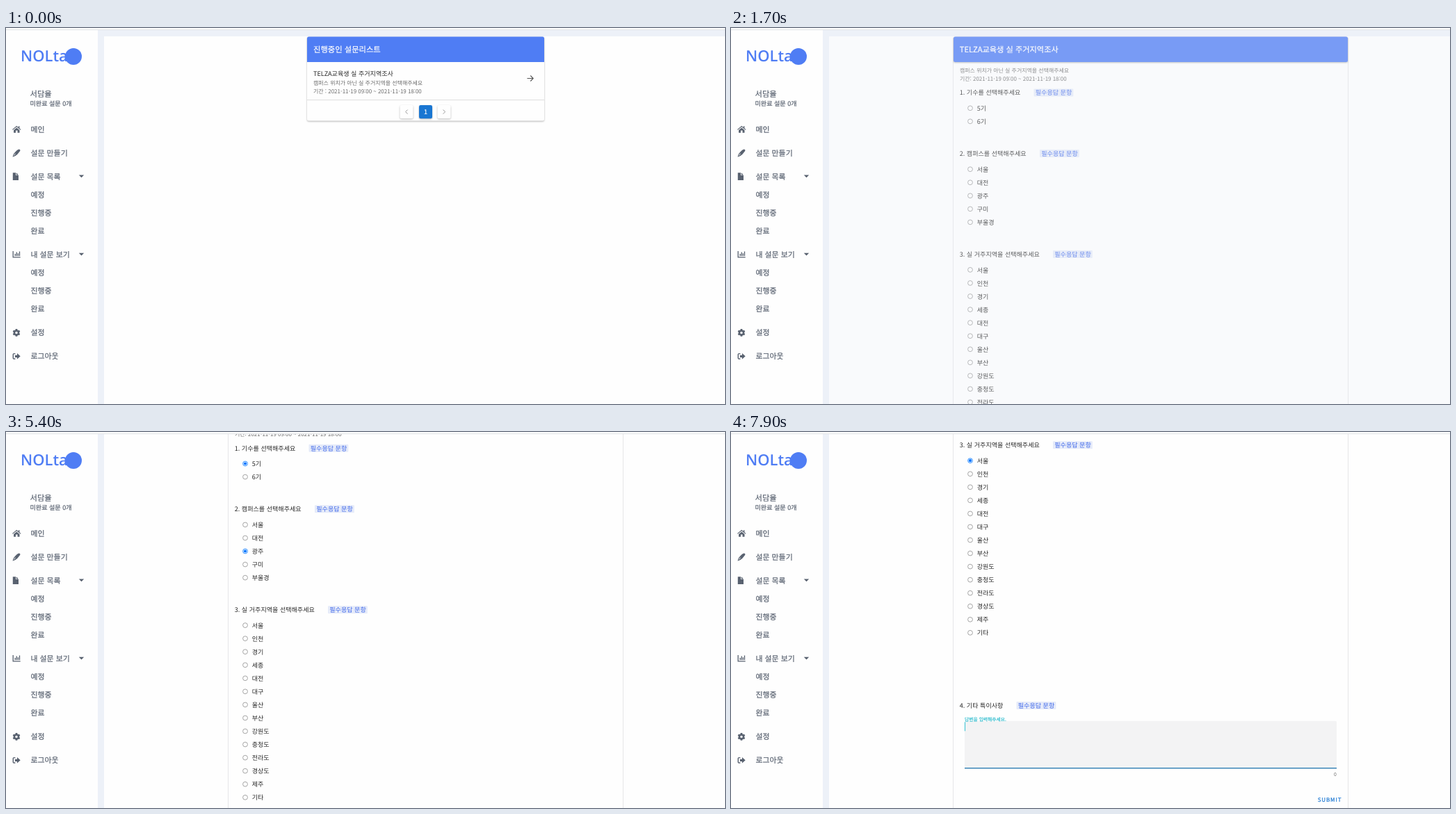
Recreate the animation shown at these times as an HTML page. Size 1034 by 541 pixels, loop 8000 ms.

```html
<!DOCTYPE html>
<html lang="ko">
<head>
<meta charset="utf-8">
<style>
  html, body { margin: 0; width: 100%; height: 100%; overflow: hidden; background: #edf1f8; }
  svg { display: block; }
  text {
    font-family: "Noto Sans CJK KR", "Noto Sans CJK", "Noto Sans CJK JP", sans-serif;
    text-rendering: geometricPrecision; white-space: pre;
  }
  .medium { font-weight: 500; stroke-width: .2; }
  .card { filter: drop-shadow(0 1px 1px rgba(0, 0, 0, .3)); }
  .raised { filter: drop-shadow(0 1px .8px rgba(0, 0, 0, .28)); }
</style>
</head>
<body>
<svg id="stage" width="1034" height="541" viewBox="0 0 1034 541"></svg>
<script>
const stage = document.getElementById('stage');
const BLUE = '#4f7df4', PRIMARY = '#1976d2', SLATE = '#596270', INK = '#262626', GREY = '#6a6a6a';
const LOOP = 8000;

function add(parent, tag, attrs = {}, content = '') {
  const node = document.createElementNS('http://www.w3.org/2000/svg', tag);
  set(node, attrs);
  node.textContent = content;
  return parent.appendChild(node);
}
function set(node, attrs) {
  for (const key in attrs) node.setAttribute(key, attrs[key]);
}
const group = (parent, attrs) => add(parent, 'g', attrs);
const rect = (parent, x, y, width, height, fill, attrs = {}) =>
  add(parent, 'rect', { x, y, width, height, fill, ...attrs });
const path = (parent, d, attrs) => add(parent, 'path', { d, ...attrs });
const line = (parent, d, stroke, width = 1) =>
  path(parent, d, { fill: 'none', stroke, 'stroke-width': width });

// y is the visual middle of the line of text
const text = (parent, content, x, y, size, fill, attrs = {}) =>
  add(parent, 'text', { x, y: y + size * .38, 'font-size': size, fill, ...attrs }, content);
const medium = (parent, content, x, y, size, fill, attrs = {}) =>
  text(parent, content, x, y, size, fill, { class: 'medium', stroke: fill, ...attrs });

const SURVEY = 'TELZA교육생 실 주거지역조사';
const NOTE = '캠퍼스 위치가 아닌 실 주거지역을 선택해주세요';
const PERIOD = '2021-11-19 09:00 ~ 2021-11-19 18:00';

// Survey list
const list = group(stage);
rect(list, 141, 12, 893, 529, '#fefefe');
rect(list, 433, 12.5, 341, 121, '#fefefe', { rx: 2.5, class: 'card' });
path(list, 'M433 49V15a2.5 2.5 0 0 1 2.5-2.5h336A2.5 2.5 0 0 1 774 15V49Z', { fill: BLUE });
medium(list, '진행중인 설문리스트', 442, 30.5, 11.3, '#fff');
text(list, SURVEY, 442, 66, 9.05, INK);
text(list, NOTE, 442, 78.7, 7.95, GREY);
text(list, '기간 : ' + PERIOD, 442, 91, 7.95, GREY);
line(list, 'M433 103.5H774', '#dedede');
const hover = add(list, 'circle', { cx: 754, cy: 72.5, r: 10.2, fill: '#000', opacity: .2 });
line(list, 'M749.5 72.5H758M754.3 68.5L758.2 72.5L754.3 76.5', '#555', 1.1);
for (const [x, fill] of [[566.5, '#fefefe'], [594, PRIMARY], [620.5, '#fefefe']])
  rect(list, x, 111, 19, 19.2, fill, { rx: 2.3, class: 'raised' });
line(list, 'M577.6 117.6L574.6 120.6L577.6 123.6M628.6 117.6L631.6 120.6L628.6 123.6', '#999');
medium(list, '1', 603.4, 121, 9.05, '#fff', { 'text-anchor': 'middle' });

// Survey form
const form = group(stage);
rect(form, 141, 12, 893, 900, '#fefefe');
line(form, 'M319.5 14V900M887.5 14V900', '#e6e6e8');
rect(form, 320, 12.5, 567, 36.5, BLUE, { rx: 2.5, class: 'card' });
medium(form, SURVEY, 328.7, 30.5, 11.2, '#fff');
text(form, NOTE, 329, 60.8, 7.95, GREY);
text(form, '기간: ' + PERIOD, 329, 72.7, 7.95, GREY);

function radio(x, y) {
  const ring = add(form, 'circle', { cx: x, cy: y, r: 3.4 });
  const dot = add(form, 'circle', { cx: x, cy: y, r: 2.1 });
  return (checked, state) => {
    const palette = checked
      ? { rest: '#0075ff', hover: '#005cc8', active: '#3793ff' }
      : { rest: '#767676', hover: '#3c3c3c', active: '#8d8d8d' };
    const color = palette[state];
    set(ring, { stroke: color, fill: '#fff', 'stroke-width': checked ? .8 : .65 });
    set(dot, { fill: checked ? color : 'none' });
  };
}
function question(title, y, badgeX, firstY, options) {
  text(form, title, 328.8, y, 9.05, INK);
  rect(form, badgeX, y - 5.4, 56.8, 11, '#e6ebf9', { rx: 1 });
  text(form, '필수응답 문항', badgeX + 2.3, y, 9.05, '#3f68ea');
  return options.map((label, i) => {
    const optionY = firstY + i * 19.05;
    text(form, label, 353.7, optionY, 9.05, INK);
    const paint = radio(344, optionY - .2);
    paint(false, 'rest');
    return paint;
  });
}
const terms = question('1. 기수를 선택해주세요', 93, 435.5, 115.5, ['5기', '6기']);
const campuses = question('2. 캠퍼스를 선택해주세요', 180.5, 444, 203.4,
  ['서울', '대전', '광주', '구미', '부울경']);
const regions = question('3. 실 거주지역을 선택해주세요', 325.4, 463, 348.1,
  ['서울', '인천', '경기', '세종', '대전', '대구', '울산', '부산',
   '강원도', '충청도', '전라도', '경상도', '제주', '기타']);
question('4. 기타 특이사항', 700.2, 410.5, 0, []);

rect(form, 336, 722.5, 535, 68, '#f3f3f4', { rx: 2 });
line(form, 'M336 790.4H871', '#8c8c8c', .7);
const underline = line(form, 'M-267.5 0H267.5', '#2379b4', 1.4);
const caret = line(form, 'M336.5 724V737', '#36c3d3', 1);
const label = text(form, '답변을 입력해주세요.', 0, 0, 9.05, GREY);
text(form, '0', 870.7, 798.8, 6.8, GREY, { 'text-anchor': 'end' });
medium(form, 'SUBMIT', 843.7, 836, 7.95, PRIMARY, { 'letter-spacing': .9 });

// Sidebar and top edge
rect(stage, 0, 0, 132, 541, '#fefefe');
rect(stage, 132, 3, 9, 538, '#edf1f8');
rect(stage, 0, 0, 1034, 3, '#fdfdfd');
line(stage, 'M0 2.6H1034', '#dfe1e5', .9);
add(stage, 'text', {
  x: 21, y: 48, 'font-size': 22, fill: BLUE,
  style: 'font-family: "Open Sans", sans-serif; font-weight: 600'
}, 'NOLta');
add(stage, 'circle', { cx: 97, cy: 41, r: 12, fill: BLUE });
medium(stage, '서담율', 34.5, 94.8, 11.3, SLATE);
medium(stage, '미완료 설문 0개', 34.5, 108.3, 9.05, SLATE);

const menu = [
  ['메인', 145.4], ['설문 만들기', 179.7], ['설문 목록', 213.5], ['예정', 239.7], ['진행중', 265.4],
  ['완료', 291.5], ['내 설문 보기', 326], ['예정', 352], ['진행중', 377.6], ['완료', 403.8],
  ['설정', 438.3], ['로그아웃', 472.2]
];
for (const [title, y] of menu) medium(stage, title, 35.5, y, 10.9, SLATE);
const icon = (y, d) => path(stage, d, { fill: SLATE, transform: `translate(15 ${y})` });
for (const y of [213.3, 325.6])
  path(stage, 'M-3.7-1.9H3.7L0 1.9Z', { fill: SLATE, transform: `translate(108.5 ${y})` });

icon(145.8, 'M-5.9.1L.3-5.1 2.9-2.9V-4.6H4.4V-1.6L6.5.1 5.8 1 .3-3.6-5.2 1ZM-3.9 1.2L.3-2.3 4.5 1.2V5H1.6V1.8H-1V5H-3.9Z');
icon(180, 'M1-4.2L3-5.3Q4.2-5.8 5-4.9Q5.8-4 5.2-2.9L1.2 2-2 4.2-5.5 5.4-4.2 1.5-1.8-1.6ZM-3.7 3.8L-1.1 1-1.7.4-4.1 3.2Z');
icon(213.7, 'M-5.2-5.4H-1V-1.6H3V5.4H-5.2ZM-.2-5.4L3-2.3H-.2Z');
line(stage, 'M10.2 321V329.8H20.7M13.2 328V325M15.3 328V322.5M17.4 328V324.2M19.5 328V321.5', SLATE, 1.3);
add(stage, 'circle', { cx: 15, cy: 438.4, r: 3, fill: 'none', stroke: SLATE, 'stroke-width': 2.5 });
for (let angle = 30; angle < 390; angle += 60)
  rect(stage, -1.4, -5.4, 2.8, 2.5, SLATE, { rx: .5, transform: `translate(15 438.4) rotate(${angle - 30})` });
line(stage, 'M13.4 468.6H11.3Q10.3 468.6 10.3 469.6V475Q10.3 476 11.3 476H13.4', SLATE, 1.4);
icon(472.3, 'M-2-1.6H1V-4.3L5.7 0 1 4.3V1.6H-2Z');

// Motion
const ease = x => 1 - (1 - Math.min(1, Math.max(0, x))) ** 2.2;

// Value of the latest [time, value] step reached
const at = (steps, t) => steps.reduce((value, [time, next]) => t >= time ? next : value, steps[0][1]);

const SCROLL = [[0, 0], [5300, 18], [5400, 69.8], [5500, 113.2],
  [6900, 115], [7000, 122], [7100, 256], [7200, 306.7]];

const CLICKS = [
  { paint: terms[0], enter: 3100, press: 3300, check: 3300, leave: 3600 },
  { paint: campuses[2], enter: 4200, press: 4700, check: 4800, leave: 5000 },
  { paint: regions[0], enter: 6100, press: 6600, check: 6700, leave: 6900 }
];

function render(t) {
  set(list, { opacity: t < 1300 ? 1 - ease((t - 900) / 490) : 0 });
  set(hover, { visibility: t >= 900 ? 'visible' : 'hidden' });
  set(form, {
    opacity: t < 1500 ? 0 : ease((t - 1430) / 600),
    transform: `translate(0 ${-at(SCROLL, t)})`
  });
  for (const { paint, enter, press, check, leave } of CLICKS)
    paint(t >= check, at([[0, 'rest'], [enter, 'hover'], [press, 'active'], [check, 'hover'], [leave, 'rest']], t));

  const focus = ease((t - 7450) / 450);
  set(underline, { transform: `translate(603.5 790.3) scale(${focus} 1)`, opacity: focus ? 1 : 0 });
  set(caret, { opacity: focus ? 1 : 0 });
  set(label, {
    transform: `translate(336 ${731.7 - 11.5 * focus}) scale(${1 - .25 * focus})`,
    fill: focus ? '#22b8cb' : GREY,
    stroke: focus ? '#22b8cb' : 'none',
    'stroke-width': .2
  });
}

const start = performance.now();
function tick() {
  const t = (performance.now() - start) % LOOP;
  render(Math.floor(t / 100) * 100);
  requestAnimationFrame(tick);
}
tick();
</script>
</body>
</html>
```
